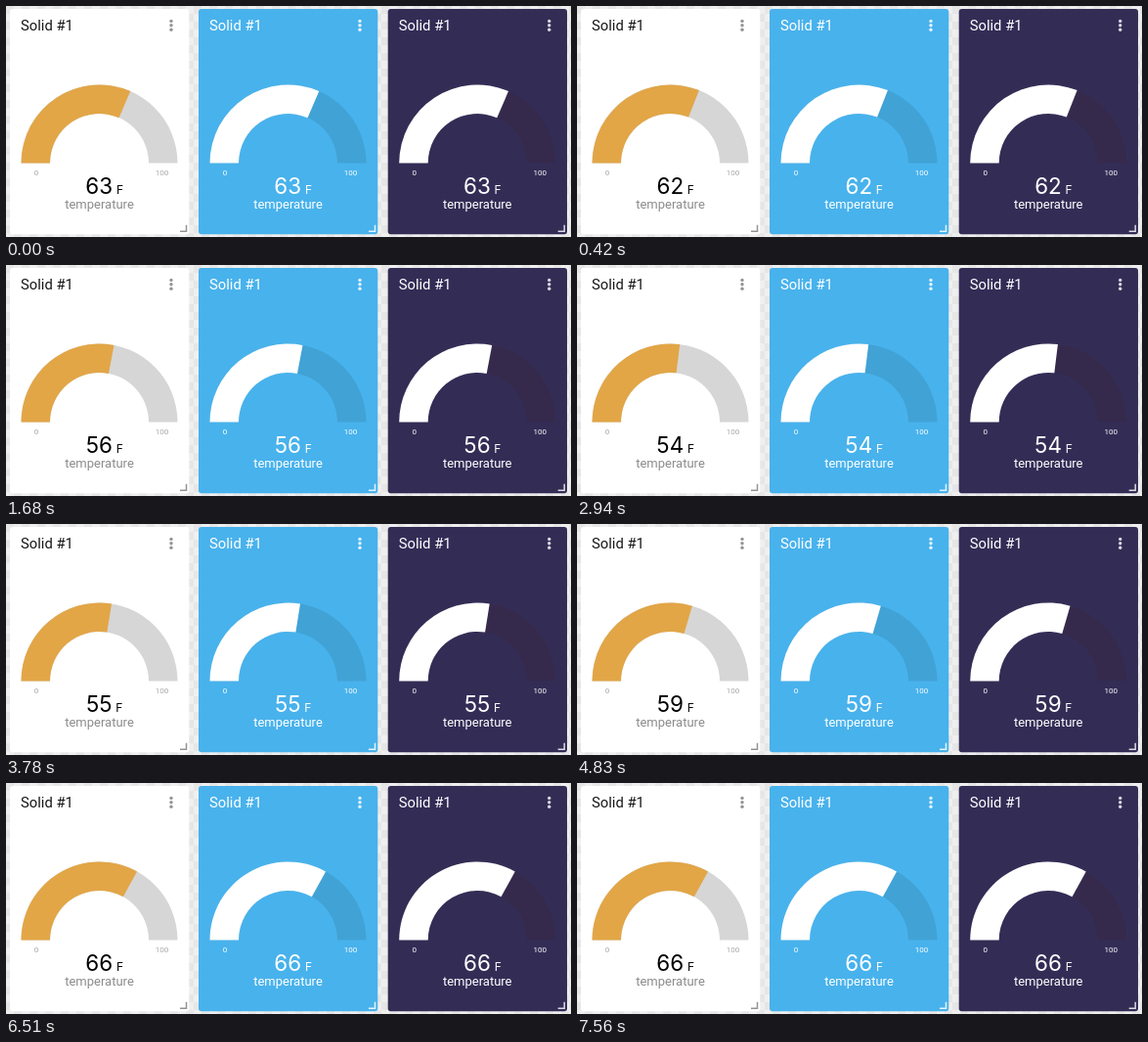
Write an HTML page that moves like this. It is 578 by 236 pixels and loops after 7770 ms.

```html
<!DOCTYPE html>
<html lang="en">
<head>
<meta charset="utf-8">
<style>
html, body { margin: 0; width: 100%; height: 100%; overflow: hidden; background: #ececec; }
svg { display: block; width: 578px; height: 236px; font-family: Roboto, sans-serif; }
.title { font-size: 14.8px; }
.limit { font-size: 8px; text-anchor: middle; }
.number, .unit { font-family: Inter, sans-serif; }
.number { font-size: 22.5px; text-anchor: middle; }
.unit { font-size: 12px; }
.label { font-size: 13px; text-anchor: middle; }
</style>
</head>
<body>
<svg viewBox="0 0 578 236">
  <defs>
    <pattern id="checker" width="16" height="16" patternUnits="userSpaceOnUse">
      <rect width="16" height="16" fill="#efefef"/>
      <path d="M0 0h8v16h8v-8H0z" fill="#e6e6e6"/>
    </pattern>
  </defs>
  <rect width="578" height="236" fill="url(#checker)"/>
  <g id="cards"></g>
</svg>
<script>
const LOOP = 7770, STEP = 70;
const CX = 95.5, CY = 160.5, OUTER = 80, INNER = 50.5;

const themes = [
  { x: 0, card: '#ffffff', fill: '#e2a647', track: '#d6d6d6', title: '#161616',
    number: '#000000', label: '#8c8c8c', limit: '#a6a6a6', icon: '#949494' },
  { x: 193, card: '#48b2ec', fill: '#ffffff', track: '#41a2d5', title: '#ffffff',
    number: '#ffffff', label: '#ffffff', limit: '#ffffff', icon: '#e4f3fc' },
  { x: 386.7, card: '#332d56', fill: '#ffffff', track: '#352a4c', title: '#ffffff',
    number: '#ffffff', label: '#ffffff', limit: '#ffffff', icon: '#d9d8e0' }
];

// Each reading: start time, end time, new value
const readings = [
  [0, 420, 62], [700, 910, 61], [1330, 1680, 56], [2100, 2450, 53], [2800, 3080, 54],
  [3430, 3640, 55], [4270, 4550, 59], [5110, 5390, 65], [6300, 6510, 66]
];

function valueAt(time) {
  let value = 63;
  for (const [start, end, next] of readings) {
    const p = Math.min(1, Math.max(0, (time - start) / (end - start)));
    value += (next - value) * (1 - (1 - p) ** 3);
  }
  return value;
}

// Ring segment between two percentages of the half circle
function ring(from, to) {
  const point = (r, v) => {
    const a = Math.PI * (1 + v / 100);
    return `${CX + r * Math.cos(a)} ${CY + r * Math.sin(a)}`;
  };
  return `M${point(OUTER, from)}A${OUTER} ${OUTER} 0 0 1 ${point(OUTER, to)}` +
    `L${point(INNER, to)}A${INNER} ${INNER} 0 0 0 ${point(INNER, from)}Z`;
}

const cardMarkup = c => `
  <g transform="translate(${c.x} 0)">
    <rect x="4" y="3" width="183.3" height="230.3" rx="3" fill="${c.card}"/>
    <text class="title" x="15" y="25" fill="${c.title}">Solid #1</text>
    <g fill="${c.icon}">${[15.4, 19.8, 24.2].map(y => `<circle cx="169" cy="${y}" r="1.7"/>`).join('')}</g>
    <path d="${ring(0, 100)}" fill="${c.track}"/>
    <path class="arc" fill="${c.fill}"/>
    <text class="limit" x="31" y="173" fill="${c.limit}">0</text>
    <text class="limit" x="159.5" y="173" fill="${c.limit}">100</text>
    <text class="number" x="95.3" y="191.5" fill="${c.number}"></text>
    <text class="unit" y="191.5" fill="${c.number}">F</text>
    <text class="label" x="95.5" y="207" fill="${c.label}">temperature</text>
    <path d="M178 230.2h6.5v-6.5" fill="none" stroke="${c.icon}" stroke-width="1.5"/>
  </g>`;

const cards = document.getElementById('cards');
cards.innerHTML = themes.map(cardMarkup).join('');
const gauges = [...cards.children].map(g => ({
  arc: g.querySelector('.arc'),
  number: g.querySelector('.number'),
  unit: g.querySelector('.unit')
}));

function draw(now) {
  const time = Math.floor((now % LOOP) / STEP) * STEP;
  const value = valueAt(time);
  for (const { arc, number, unit } of gauges) {
    arc.setAttribute('d', ring(0, value));
    number.textContent = Math.round(value);
    unit.setAttribute('x', 95.3 + number.getComputedTextLength() / 2 + 3.7);
  }
}

const begin = performance.now();
function tick() {
  draw(performance.now() - begin);
  requestAnimationFrame(tick);
}
tick();
</script>
</body>
</html>
```
